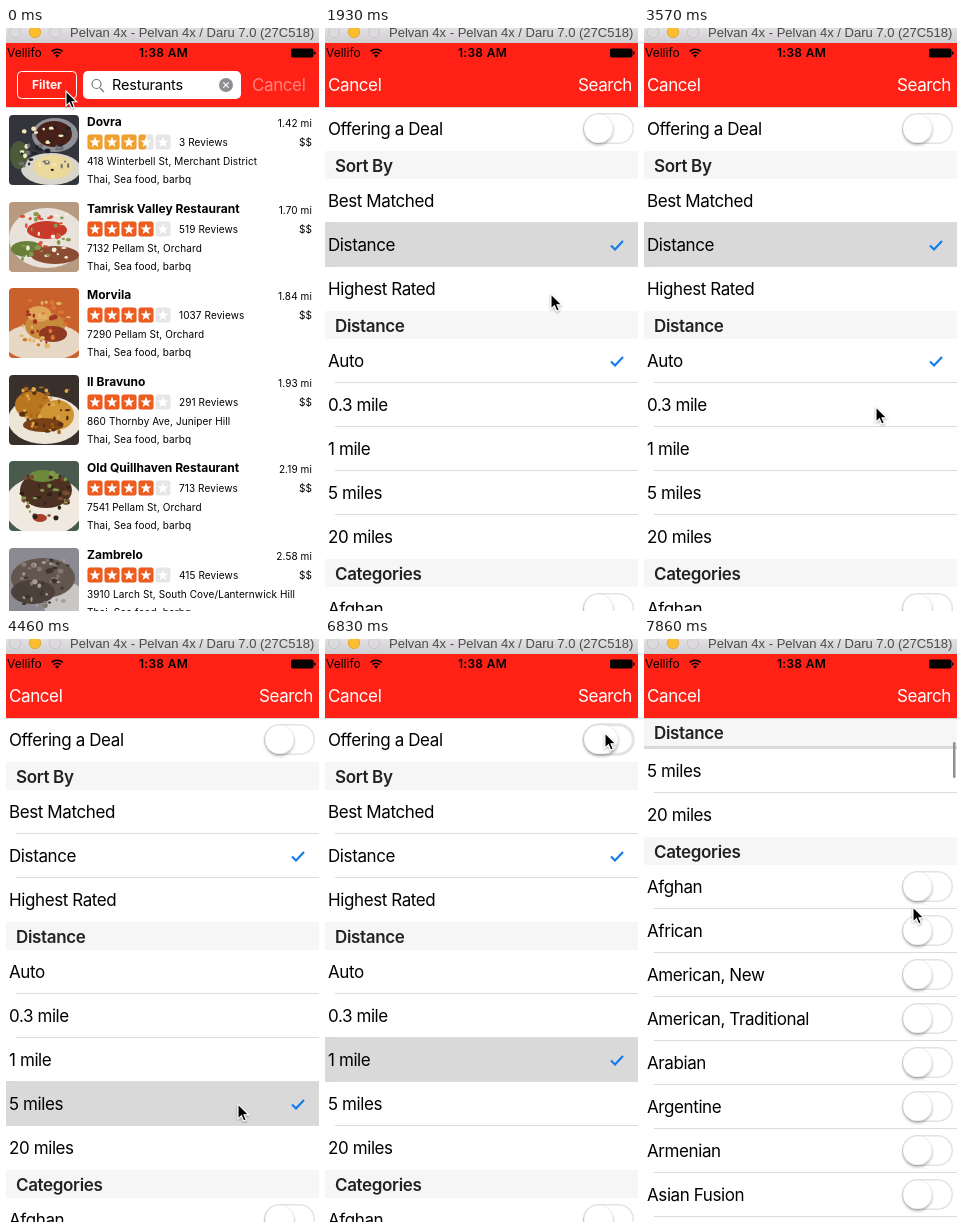
Animation of 313 by 583 pixels, one loop 8 s. Source, as an HTML page:

```html
<!DOCTYPE html>
<html lang="en">
<head>
<meta charset="utf-8">
<title>Restaurant filters</title>
<style>
  html, body { margin: 0; width: 100%; height: 100%; overflow: hidden; background: #fff; }
  svg { display: block; width: 100%; height: 100%; }
  text { font-family: Inter, Roboto, sans-serif; white-space: pre; }
  .body { font-size: 17px; letter-spacing: -.4px; }
  .head { font-size: 17px; letter-spacing: -.34px; font-weight: 600; fill: #222; }
  .name { font-size: 12px; font-weight: 700; }
  .small { font-size: 10px; letter-spacing: .1px; }
  .status { font-size: 12px; }
  .clock { font-size: 12px; letter-spacing: .3px; font-weight: 600; }
  .title { font: 13px "Liberation Sans", Arial, sans-serif; fill: #4b4b4b; }
</style>
</head>
<body>
<svg id="stage" viewBox="0 0 313 583" preserveAspectRatio="none"></svg>
<script>
const RED = '#ff2116', NAV = 79, ROW = 44, HEAD = 28;
const LOOP = 8000, STEP = 148.5, LAST = 53;

const text = (x, y, s, cls, more = '') => `<text x="${x}" y="${y}" class="${cls}" ${more}>${s}</text>`;
const rect = (x, y, w, h, fill, more = '') =>
  `<rect x="${x}" y="${y}" width="${w}" height="${h}" fill="${fill}" ${more}/>`;
const group = (id, inner) => `<g id="${id}">${inner}</g>`;
const END = 'text-anchor="end"', MID = 'text-anchor="middle"';

function random(seed) {
  return () => (seed = (seed * 16807) % 2147483647) / 2147483647;
}

const navBar = rect(0, 15, 313, 64, RED) + rect(0, 79, 313, .5, '#000', 'opacity=".3"');

// ---- Restaurant list ----
// Dishes: background, soft shapes "colour cx cy rx ry", then crumb colours.
const places = [
  ['Dovra', '1.42', 3, 3.5, '418 Winterbell St, Merchant District',
    '#34353c', ['#8d9096 46 20 23 17', '#48201a 45 19 18 13', '#d8d5cc 42 54 30 16', '#ead99a 44 52 20 12', '#4d5a3a 10 40 9 14'], ['#f3e9bd', '#6f7076', '#20232a']],
  ['Tamrisk Valley Restaurant', '1.70', 519, 4, '7132 Pellam St, Orchard',
    '#b79a80', ['#e8e2da 38 36 38 30', '#66803a 18 47 16 8', '#c8392a 38 28 20 9', '#8a4c32 46 53 24 9'], ['#d9513a', '#86994f', '#f2ece0']],
  ['Morvila', '1.84', 1037, 4, '7290 Pellam St, Orchard',
    '#c9612c', ['#e6d8c4 34 54 40 19', '#c88a3c 36 38 20 14', '#8e3a20 44 46 14 8', '#dfa65a 30 26 12 8'], ['#e2b566', '#a33320', '#d8772f']],
  ['Il Bravuno', '1.93', 291, 4, '860 Thornby Ave, Juniper Hill',
    '#3a302b', ['#ece5d8 36 45 37 24', '#b9761f 24 30 18 14', '#cf9433 48 40 17 15', '#7b4215 34 50 20 7'], ['#e0aa48', '#5a3012', '#a8641c']],
  ['Old Quillhaven Restaurant', '2.19', 713, 4, '7541 Pellam St, Orchard',
    '#4a5a4c', ['#efe9df 35 45 40 30', '#4c3122 37 29 26 18', '#6d8a3c 34 15 14 6', '#a8402a 31 57 7 4'], ['#7a4a30', '#2f2018', '#7f9a48']],
  ['Zambrelo', '2.58', 415, 4, '3910 Larch St, South Cove/Lanternwick Hill',
    '#8b8a92', ['#c9c6c6 56 54 22 20', '#62564e 34 30 32 20', '#4b403a 24 44 22 12'], ['#857a72', '#3c332f', '#a59c95']]
];

const starPoints = Array.from({ length: 10 }, (_, i) => {
  const r = i % 2 ? 2.4 : 5.8, a = i * Math.PI / 5;
  return (7.5 + r * Math.sin(a)).toFixed(1) + ',' + (7.8 - r * Math.cos(a)).toFixed(1);
}).join(' ');

function stars(rating, y) {
  const full = rating < 4 ? '#f0a02c' : '#ee5b1f';
  let out = '';
  for (let i = 0; i < 5; i++) {
    const part = Math.max(0, Math.min(1, rating - i));
    out += `<g transform="translate(${81.5 + i * 17} ${y})">` + rect(0, 0, 15, 15, '#e6e6e6', 'rx="2.5"') +
      (part ? rect(0, 0, 15 * part, 15, full, 'rx="2.5"') : '') +
      `<polygon points="${starPoints}" fill="#fff"/></g>`;
  }
  return out;
}

function dish(n, base, shapes, crumbs) {
  const rnd = random(977 * (n + 3));
  let out = rect(0, 0, 70, 70, base);
  const ellipse = (c, x, y, rx, ry) => `<ellipse cx="${x}" cy="${y}" rx="${rx}" ry="${ry}" fill="${c}"/>`;
  for (const s of shapes) out += ellipse(...s.split(' '));
  for (let i = 0; i < 45; i++)
    out += ellipse(crumbs[i % 3], 12 + rnd() * 48, 12 + rnd() * 46, 1 + rnd() * 2, 1 + rnd() * 1.6);
  return `<g clip-path="url(#thumb)">${out}</g>`;
}

function place([name, miles, reviews, rating, street, ...photo], i) {
  const y = Math.round(87 + i * 86.6);
  return `<g transform="translate(3 ${y})">${dish(i, ...photo)}</g>` +
    text(81, y + 11, name, 'name') + text(306, y + 12, miles + ' mi', 'small', END) +
    stars(rating, y + 19.5) + text(173, y + 31, reviews + ' Reviews', 'small') +
    text(306, y + 31, '$$', 'small', END) + text(81, y + 49.5, street, 'small') +
    text(81, y + 68, 'Thai, Sea food, barbq', 'small');
}

const listView = rect(0, 15, 313, 568, '#fff') + places.map(place).join('') + navBar +
  group('filter', rect(11.5, 43.5, 59, 27, 'none', 'rx="4" stroke="#fff"') +
    text(41, 60.5, 'Filter', 'name', MID + ' fill="#fff"')) +
  rect(77, 43, 158, 28, '#fff', 'rx="5"') +
  '<path d="M94 60l4 4M95 56a4.5 4.5 0 1 1-9 0a4.5 4.5 0 1 1 9 0" fill="none" stroke="#777" stroke-width="1.2"/>' +
  text(106, 62, 'Resturants', 'body', 'style="font-size:14.5px;letter-spacing:-.2px"') +
  '<circle cx="220" cy="57" r="7" fill="#8e8e93"/><path d="M217.3 54.3l5.4 5.4m0-5.4l-5.4 5.4" stroke="#fff" stroke-width="1.2"/>' +
  text(246, 63, 'Cancel', 'body', 'fill="#ff827b"');

// ---- Filter screen ----
const sections = [
  ['', ['Offering a Deal']],
  ['Sort By', ['Best Matched', 'Distance', 'Highest Rated']],
  ['Distance', ['Auto', '0.3 mile', '1 mile', '5 miles', '20 miles']],
  ['Categories', ['Afghan', 'African', 'American, New', 'American, Traditional', 'Arabian', 'Argentine', 'Armenian', 'Asian Fusion']]
];

function toggle(cy, id) {
  return `<g ${id ? `id="${id}"` : ''} transform="translate(258 ${cy - 16})">` +
    rect(.75, .75, 49.5, 29.5, '#fff', 'class="track" rx="14.75" stroke="#e3e3e3" stroke-width="1.5"') +
    rect(1, 1, 29, 29, '#fff', 'class="knob" rx="14.5" stroke="#000" stroke-opacity=".1" stroke-width=".6" filter="url(#shadow)"') + '</g>';
}

const sectionTop = [], heads = [];
let rowsSvg = '', headsSvg = '', nextY = NAV;
sections.forEach(([title, rows], s) => {
  if (title) {
    heads.push(nextY);
    headsSvg += `<g class="header">${rect(0, 0, 313, HEAD, '#f6f6f6')}${text(10, 20.5, title, 'head')}</g>`;
    nextY += HEAD;
  }
  sectionTop.push(nextY);
  rows.forEach((label, r) => {
    rowsSvg += text(3, nextY + 28, label, 'body');
    if (s % 3 === 0) rowsSvg += toggle(nextY + 22, s ? '' : 'deal');
    if (r < rows.length - 1 || s === 3) rowsSvg += rect(10, nextY + 43, 303, 1, '#dcdcdf');
    nextY += ROW;
  });
});

const check = id => `<path id="${id}" d="M286 22.5l4 4l8-8.5" fill="none" stroke="#1079ee" stroke-width="2.1"/>`;

const filterView = rect(0, 15, 313, 580, '#fff') +
  group('table', rect(0, 0, 313, 45, '#d9d9d9', 'id="glow"') + rowsSvg + check('sortCheck') + check('milesCheck')) +
  headsSvg + rect(309, 0, 2.5, 36, '#8f8f8f', 'id="thumbBar" rx="1.25"') + navBar +
  text(3, 63, 'Cancel', 'body', 'fill="#fff"') + text(307, 63, 'Search', 'body', END + ' fill="#fff"');

// ---- Window chrome ----
const light = (x, fill, line) => `<circle cx="${x}" cy="4" r="5.7" fill="${fill}" stroke="${line}" stroke-width=".8"/>`;
const chrome = rect(0, 0, 313, 15, 'url(#bar)') +
  light(9, '#dcdadc', '#c3c1c3') + light(29, '#fdbd2d', '#dfa023') + light(49, '#dcdadc', '#c3c1c3') +
  text(64, 9, 'Pelvan 4x - Pelvan 4x / Daru 7.0 (27C518)', 'title') +
  text(1, 29.3, 'Vellifo', 'status') + text(157.5, 29.3, '1:38 AM', 'clock', MID) +
  '<path d="M45.6 23.3a8.2 8.2 0 0 1 11 0M47.6 25.7a5.2 5.2 0 0 1 7 0" fill="none" stroke="#000" stroke-width="1.6"/>' +
  '<path d="M51.1 29.7l-2-2.3a3 3 0 0 1 4 0z"/>' +
  rect(285, 20.5, 22.5, 9, '#000', 'rx="1.8"') + rect(308, 23.4, 1.5, 3.2, '#000', 'rx=".7"');

const stage = document.getElementById('stage');
stage.innerHTML = `<defs>
  <linearGradient id="bar" x2="0" y2="1"><stop stop-color="#e2e0e2"/><stop offset="1" stop-color="#d0ced0"/></linearGradient>
  <clipPath id="thumb"><rect width="70" height="70" rx="4"/></clipPath>
  <filter id="shadow" x="-30%" y="-30%" width="160%" height="170%"><feDropShadow dx="0" dy="2" stdDeviation="1.4" flood-opacity=".3"/></filter>
  <filter id="soft" x="-30%" y="-30%" width="160%" height="160%"><feDropShadow dx="0" dy="1" stdDeviation=".8" flood-opacity=".4"/></filter>
</defs>` + listView + group('modal', filterView) + chrome +
  '<path id="cursor" d="M0 0V14.8L3.4 11.7L5.7 17L8.2 15.9L6 10.8H10.8Z" stroke="#fff" stroke-width="1.1" filter="url(#soft)"/>';

// ---- Motion ----
const pointer = [
  [0, 60, 63], [300, 60, 63], [742, 186, 158], [1190, 226, 190], [1480, 228, 214], [1640, 228, 214],
  [1930, 226, 266], [2530, 226, 266], [2820, 230, 172], [2970, 230, 172], [3110, 232, 215], [3270, 232, 216],
  [3564, 232, 379], [3720, 232, 387], [4150, 232, 465], [4460, 232, 465], [4740, 231, 330], [5050, 231, 330],
  [5490, 231, 428], [6080, 231, 428], [6680, 280, 94], [6980, 280, 94], [7270, 272, 520], [7720, 269, 268]
];
const scrolling = [[7270, 0], [7720, 265], [7860, 333]];
// Taps: time, section, row, highlighted
const taps = [[0, 1, 0, 0], [0, 2, 0, 0], [1630, 1, 1, 1], [2820, 1, 0, 1], [3110, 1, 1, 1],
  [4150, 2, 3, 1], [4740, 2, 0, 1], [5640, 2, 2, 1]];

function track(keys, t) {
  const i = keys.findIndex(k => k[0] > t);
  if (i === 0) return keys[0].slice(1);
  if (i < 0) return keys[keys.length - 1].slice(1);
  const a = keys[i - 1], b = keys[i], p = (t - a[0]) / (b[0] - a[0]);
  return a.slice(1).map((v, n) => v + (b[n + 1] - v) * p);
}

const $ = id => document.getElementById(id);
const move = (el, x, y) => el.setAttribute('transform', `translate(${x} ${y})`);
const set = (el, attrs) => { for (const a in attrs) el.setAttribute(a, attrs[a]); };
const headers = [...document.querySelectorAll('.header')];
const dealTrack = $('deal').querySelector('.track'), dealKnob = $('deal').querySelector('.knob');

function draw(t) {
  $('filter').setAttribute('opacity', t > 140 && t < 370 ? .35 : 1);

  // Critically damped slide from the bottom
  const x = Math.max(0, t - 370) / 1000 * 16.4;
  move($('modal'), 0, Math.round(568 * (1 + x) * Math.exp(-x)));

  const [scroll] = track(scrolling, t).map(Math.round);
  move($('table'), 0, -scroll);
  headers.forEach((h, i) => {
    const stuck = Math.max(NAV, heads[i] - scroll);
    move(h, 0, Math.min(stuck, i < 2 ? heads[i + 1] - scroll - HEAD : stuck));
  });
  set($('thumbBar'), { y: NAV + scroll * 24 / 333, opacity: scroll ? 1 : 0 });

  const done = taps.filter(k => k[0] <= t);
  for (const [, s, r] of done) move($(s === 1 ? 'sortCheck' : 'milesCheck'), 0, sectionTop[s] + r * ROW);
  const [, s, r, lit] = done[done.length - 1];
  set($('glow'), { y: sectionTop[s] + r * ROW - 1, opacity: lit });

  const on = t > 6900, pressed = t > 6760 && !on;
  set(dealTrack, { fill: on ? '#4cd964' : '#fff', stroke: on ? '#4cd964' : '#e3e3e3',
    'stroke-width': pressed ? 3 : 1.5 });
  set(dealKnob, { x: on ? 21 : 1, width: pressed ? 34 : 29 });

  move($('cursor'), ...track(pointer, t));
}

const start = performance.now();
function tick(now) {
  const t = Math.max(0, now - start) % LOOP;
  draw(Math.min(LAST, Math.floor((t + 11) / STEP)) * STEP);
  requestAnimationFrame(tick);
}
draw(0);
requestAnimationFrame(tick);
</script>
</body>
</html>
```
